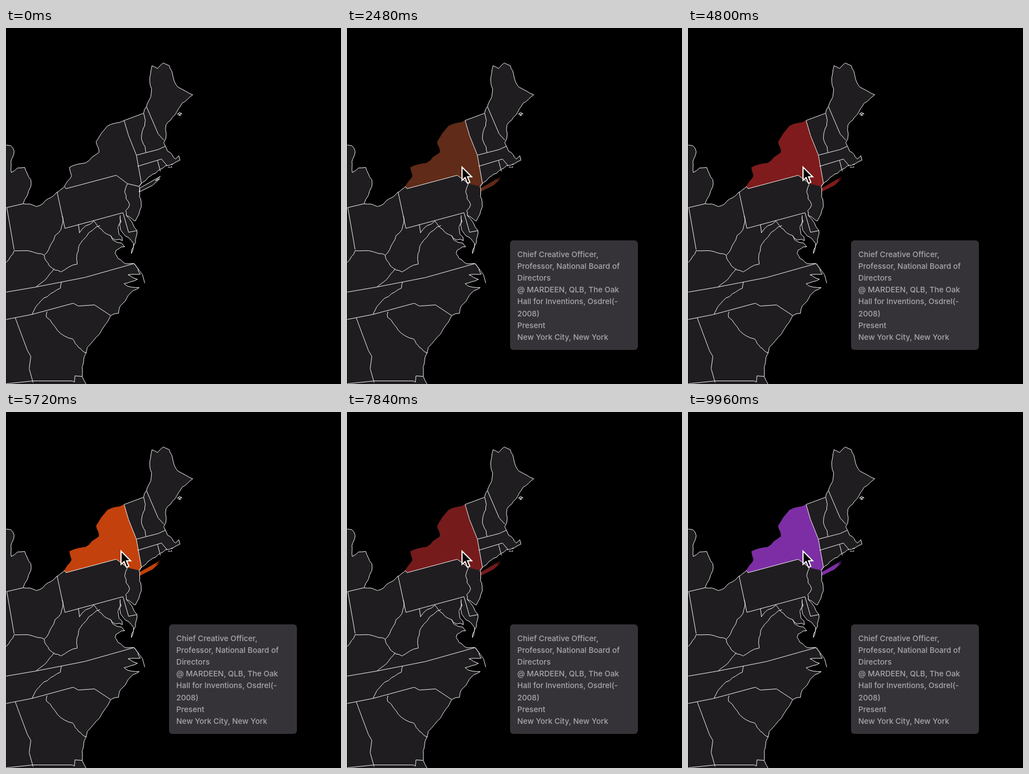
Animation, 600 px wide and 637 px high, one loop 10 s. Source, as an HTML page:

```html
<!DOCTYPE html>
<html lang="en">
<head>
<meta charset="utf-8">
<title>Career map</title>
<style>
  html, body { margin: 0; width: 100%; height: 100%; overflow: hidden; background: #000; }
  svg { display: block; width: 100%; height: 100%; }
  .line { fill: none; stroke: #f2f2f2; stroke-linejoin: round; }
  text { font: 500 13.7px Inter, Roboto, sans-serif; fill: #a9a7aa; }
</style>
</head>
<body>
<svg viewBox="0 0 600 637">
  <g transform="translate(.5 .5)">
    <path id="land" fill="#1f1d20"/>
    <path id="newYork"/>
    <path id="nyOutline" class="line"/>
    <path id="lines" class="line"/>
  </g>
  <g id="tip">
    <rect x="292" y="380" width="229" height="196" rx="6" fill="#353337"/>
  </g>
  <path id="cursor" d="M2 2.8V26.5L7.6 21.6 11.7 31.8 16 30 11.9 20.2H19.3Z" fill="#000" stroke="#fff" stroke-width="2"/>
</svg>
<script>
const LOOP = 10000, HOVER = 2240, CYCLE = 3000;
const $ = id => document.getElementById(id);
const clamp = v => Math.min(1, Math.max(0, v));
const smooth = v => v * v * (3 - 2 * v);
const mix = (a, b, v) => a + (b - a) * v;
const path = points => 'M' + points;

let seed = 7;
const random = () => (seed = seed * 16807 % 2147483647) / 2147483647;

// Midpoint displacement: turns a few key points into a natural shore or river.
function rough(points, sway = .1) {
  const n = points.split(' ').map(Number);
  const out = [n[0], n[1]];
  const divide = (x0, y0, x1, y1) => {
    if (Math.hypot(x1 - x0, y1 - y0) < 9) return out.push(x1, y1);
    const bend = (random() * 2 - 1) * sway;
    const x = (x0 + x1) / 2 - (y1 - y0) * bend, y = (y0 + y1) / 2 + (x1 - x0) * bend;
    divide(x0, y0, x, y);
    divide(x, y, x1, y1);
  };
  for (let i = 2; i < n.length; i += 2) divide(n[i - 2], n[i - 1], n[i], n[i + 1]);
  return out.map(v => v.toFixed(1)).join(' ');
}

// Shore, clockwise from the lakes to Florida.
const lakes = rough('0 209 8 210 14 220 9 258 20 250 33 249 44 271 44 283 30 314 54 319 75 305 104 283');
const nyShore = rough('104 283 117 264 113 249 142 241 166 222 161 203 181 175 211 165', .08);
const north = '211 165 246 152';
const coast = [
  rough('246 152 251 140 259 122 257 95 261 67 271 72 281 62 292 67 307 105 334 119 302 155 286 173 282 205 289 220 303 234 309 228 311 236 285 246 250 272 238 283'),
  rough('238 283 242 319 231 345 215 335 234 362 224 403', .08),
  rough('224 403 224 380 210 368 204 335 200 356 208 380 187 371 212 391 195 403 229 421', .2),
  rough('229 421 240 440 218 441 235 449 211 457 238 464 204 497 201 510 187 514'),
  rough('187 514 167 547 145 571 136 606 136 623 143 637', .06)
].join(' ');

const nyEast = '211 165 219 192 233 227 242 277 238 283';
const nySouth = '217 278 197 263 107 287 104 283';
const longIsland = 'M238 293L239 286 276 265 267 273 275 269 262 281Z';

const straightBorders = [
  north, nyEast, nySouth,
  '251 140 272 189 282 200',
  '233 227 272 217 285 211',
  '235 247 278 234 288 246',
  '271 237 276 256',
  '91 293 105 358 209 330 219 365 234 362',
  '0 321 30 314', '1 321 14 396',
  '0 472 53 463 140 446 229 421 244 441 248 456',
  '0 521 46 512 120 492 129 497 158 495 187 514',
  '16 518 38 577 44 587 41 609 48 634',
  '0 636 48 631 118 631 122 633 123 622 136 623'
];
const rivers = [
  '246 152 249 165 244 183 250 222',
  '217 278 212 293 221 316 214 326 215 335',
  '100 335 98 360 81 385 68 406 47 400 14 398 0 419',
  '68 406 77 425 98 436 127 422 132 386 155 361 168 353',
  '129 351 131 366 157 345 187 371',
  '86 430 70 450 53 463',
  '99 454 97 465 53 498 46 512',
  '73 507 72 517 119 556 144 581'
].map(points => rough(points));

const speck = (x, y, spread) =>
  `${x + (random() - .5) * spread} ${y + (random() - .5) * spread}l2 -2 1 2`;
const islands = Array.from({ length: 10 }, (_, i) => i < 7 ? speck(309, 153, 9) : speck(292, 246, 9));

$('land').setAttribute('d', path([lakes, nyShore, north, coast, '0 637Z'].join(' ')));
$('newYork').setAttribute('d', path([nyShore, nyEast, nySouth].join(' ')) + longIsland);
$('nyOutline').setAttribute('d', path(nyShore) + 'M217 278L238 283' + longIsland);
$('lines').setAttribute('d', [lakes, coast, ...straightBorders, ...rivers, ...islands].map(path).join(''));

[
  'Chief Creative Officer,', 'Professor, National Board of', 'Directors',
  '@ MARDEEN, QLB, The Oak', 'Hall for Inventions, Osdrel(-', '2008)',
  'Present', 'New York City, New York'
].forEach((row, i) => {
  const text = document.createElementNS('http://www.w3.org/2000/svg', 'text');
  text.setAttribute('x', 305);
  text.setAttribute('y', 410 + 21.1 * i);
  text.textContent = row;
  $('tip').append(text);
});

const stops = [
  { start: 0, end: 0, x: 558, y: 638 },
  { start: 0, end: 240, x: 522, y: 528 },
  { start: 720, end: 880, x: 424, y: 454 },
  { start: 1080, end: 1880, x: 225, y: 281 },
  { start: 2160, end: 2360, x: 204, y: 246 }
];
const palette = [[31, 29, 32], [214, 69, 10], [209, 67, 74], [121, 45, 168], [148, 26, 27], [31, 29, 32]];

function cursorAt(t) {
  const i = stops.findLastIndex(stop => t >= stop.start);
  const from = stops[i - 1], to = stops[i];
  const v = smooth(clamp((t - to.start) / (to.end - to.start)));
  return [mix(from.x, to.x, v), mix(from.y, to.y, v)];
}

function glowAt(t) {
  const step = (t % CYCLE) / CYCLE * (palette.length - 1);
  const i = Math.floor(step), v = smooth(step - i);
  return `rgb(${palette[i].map((c, k) => Math.round(mix(c, palette[i + 1][k], v)))})`;
}

function draw(t) {
  const hovered = t >= HOVER;
  $('newYork').setAttribute('fill', hovered ? glowAt(t - HOVER) : '#1f1d20');
  $('nyOutline').setAttribute('visibility', hovered ? 'hidden' : 'visible');
  const shown = clamp((t - HOVER + 40) / 240);
  $('tip').setAttribute('opacity', shown);
  $('tip').setAttribute('transform', `translate(0 ${30 * (1 - shown) ** 2})`);
  $('cursor').setAttribute('transform', `translate(${cursorAt(t)})`);
}

const origin = performance.now();
function tick() {
  draw((performance.now() - origin) % LOOP);
  requestAnimationFrame(tick);
}
draw(0);
tick();
</script>
</body>
</html>
```
